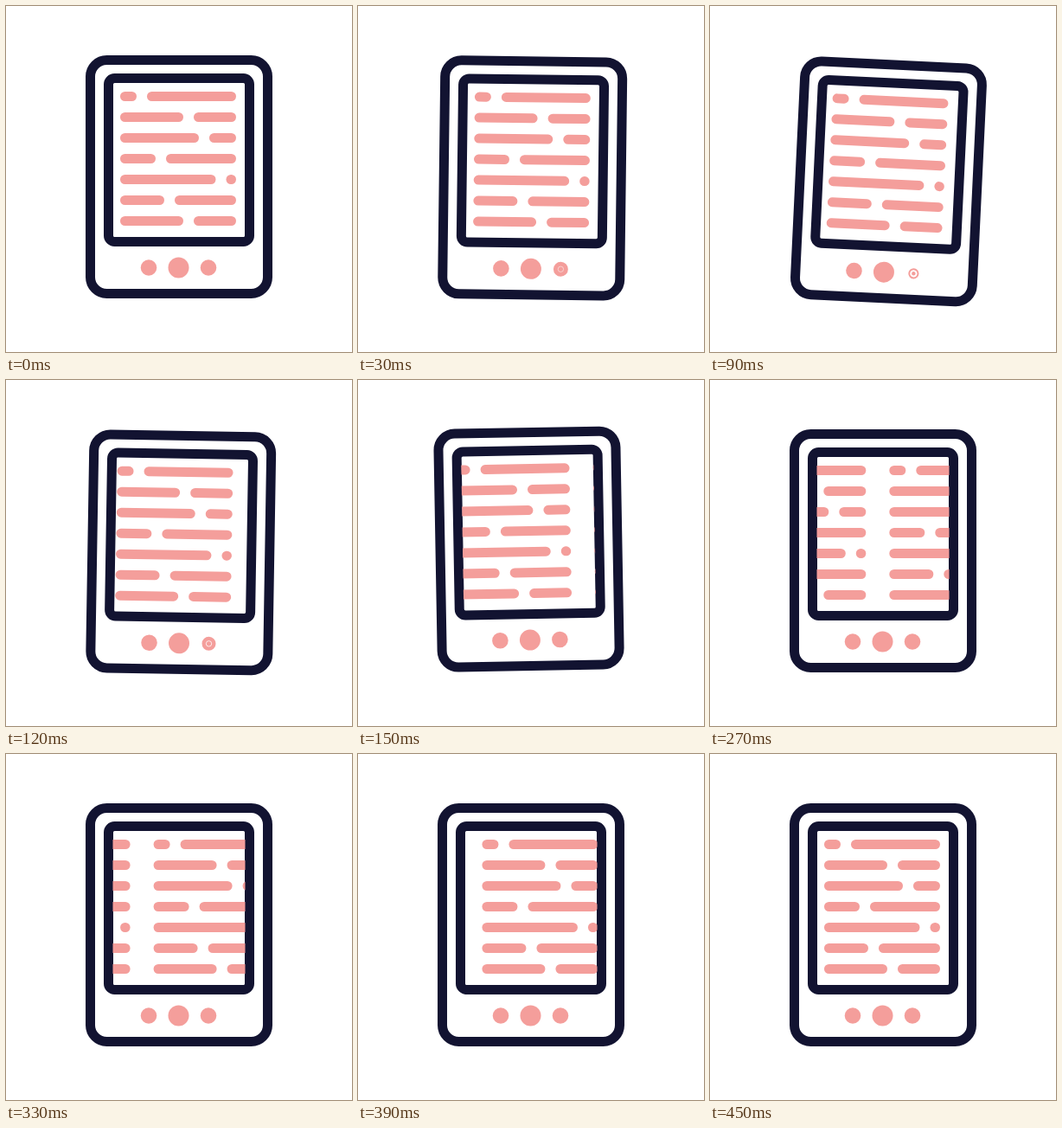
An HTML page for the animation above (0.51 s loop, 400 px wide and 400 px high).

```html
<!DOCTYPE html>
<html lang="en">
<head>
<meta charset="utf-8">
<title>E-reader page turn</title>
<style>
  html, body { margin: 0; width: 100%; height: 100%; overflow: hidden; background: #fff; }
  svg { display: block; width: 100%; height: 100%; }
  .line { fill: none; stroke: #121331; stroke-width: 11; }
  .pink { fill: #f49e9b; }
</style>
</head>
<body>
<svg viewBox="0 0 400 400">
  <defs>
    <clipPath id="screen"><rect x="123.5" y="88" width="153" height="180"/></clipPath>
  </defs>
  <g id="device">
    <rect class="line" x="97.5" y="62.5" width="205" height="270" rx="19"/>
    <rect class="line" x="118.5" y="83.5" width="163" height="189" rx="7"/>
    <g clip-path="url(#screen)"><g id="pages" class="pink"></g></g>
    <circle class="pink" cx="165" cy="302.5" r="9.3"/>
    <circle class="pink" cx="199.5" cy="302.5" r="12"/>
    <circle id="button" class="pink" cx="234" cy="302.5" r="9.3"/>
    <circle id="ring" cx="234" cy="302.5" r="3.2" fill="none" stroke="#fff"/>
  </g>
</svg>
<script>
  const LOOP = 510, STEP = 30, REST = 450;
  const PAGE = 161, LEFT = 132, RIGHT = 266, GAP = 12;
  const splits = [151, 205, 223, 173, 242.5, 183, 205];
  const el = id => document.getElementById(id);
  const device = el('device'), pages = el('pages'), button = el('button'), ring = el('ring');

  function bar(x1, x2, y) {
    const r = document.createElementNS('http://www.w3.org/2000/svg', 'rect');
    const box = { x: x1, y: y - 5.5, width: x2 - x1, height: 11, rx: 5.5 };
    for (const k in box) r.setAttribute(k, box[k]);
    pages.appendChild(r);
  }

  for (const dx of [0, PAGE]) {
    splits.forEach((s, i) => {
      const y = 104.5 + 24 * i;
      bar(LEFT + dx, s + dx, y);
      bar(s + GAP + dx, RIGHT + dx, y);
    });
  }

  const clamp = u => Math.max(0, Math.min(1, u));
  const ease = u => (1 - Math.cos(Math.PI * clamp(u))) / 2;

  // Eased value between [time, value] keys
  function track(keys, t) {
    let v = keys[0][1];
    for (let i = 1; i < keys.length; i++) {
      const [t0, v0] = keys[i - 1], [t1, v1] = keys[i];
      v += (v1 - v0) * ease((t - t0) / (t1 - t0));
    }
    return v;
  }

  const tilt = [[0, 0], [88, 2.75], [154, -1.05], [225, 0]];
  const press = [[0, 0], [88, 1], [145, 0]];

  function draw(ms) {
    let t = Math.floor((ms % LOOP) / STEP + 1e-6) * STEP;
    if (t >= REST) t = 0;
    device.setAttribute('transform', `rotate(${track(tilt, t)} 92 335)`);
    pages.setAttribute('transform', `translate(${-PAGE * ease((t - 67) / 390)} 0)`);
    const p = track(press, t);
    button.setAttribute('r', 9.3 - 3.2 * p);
    ring.setAttribute('stroke-width', Math.max(0, 1.9 * p));
  }

  function tick(now) {
    draw(now);
    requestAnimationFrame(tick);
  }
  draw(0);
  requestAnimationFrame(tick);
</script>
</body>
</html>
```
